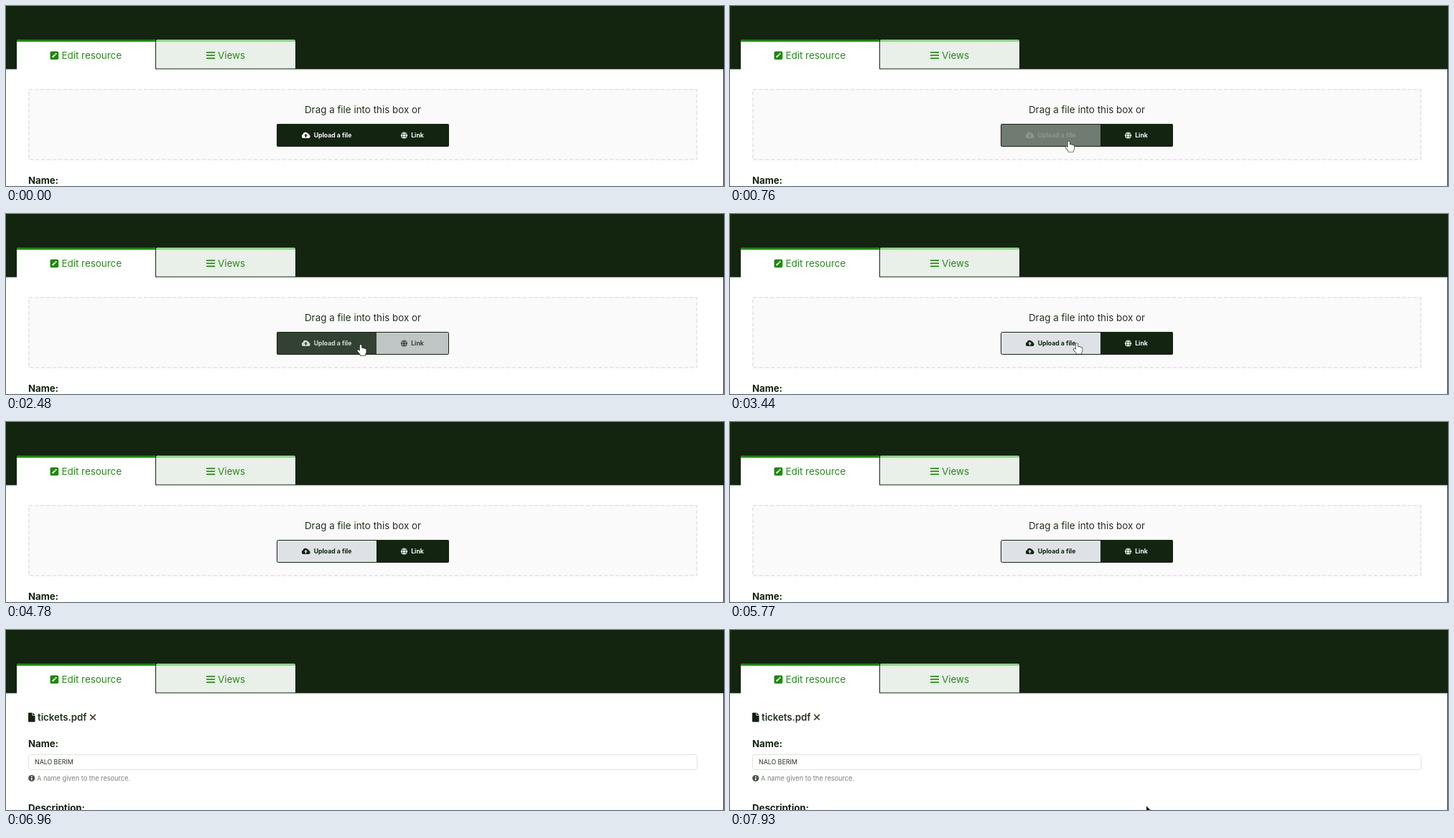
Write an HTML page with a canvas that moves like this. It is 1000 by 252 pixels and loops after 8000 ms.

```html
<!DOCTYPE html>
<html lang="en">
<head>
<meta charset="utf-8">
<title>Edit resource</title>
<style>
  html, body { margin: 0; width: 100%; height: 100%; overflow: hidden; background: #fff; }
  canvas { display: block; width: 1000px; height: 252px; }
</style>
</head>
<body>
<canvas id="stage" width="1000" height="252"></canvas>
<script>
const ctx = document.getElementById('stage').getContext('2d');
const LOOP = 8000;
const LOADING_AT = 6240, DONE_AT = 6700;
const DARK = [19, 36, 16], LIGHT = [222, 226, 230], WHITE = [248, 249, 250];
const INK = '#13240f', BODY = '#23301f', GREEN = '#1b8a03', TAB_TEXT = '#258c18';

// Pointer waypoints: time, x, y of the hot spot
const hoverPath = [
  [300, 470, 258], [860, 472, 183], [1230, 472, 183], [1700, 484, 181],
  [1830, 527, 180], [2000, 560, 181], [2380, 556, 181], [2480, 494, 183],
  [2970, 483, 181], [3850, 483, 181]
];
const returnPath = [[7700, 580, 256], [7920, 580, 246.5], [8000, 580, 246]];

const clamp = v => Math.max(0, Math.min(1, v));
const smooth = v => v * v * (3 - 2 * v);
const fade = (t, start) => smooth(clamp((t - start) / 150));
const mix = (a, b, k) => `rgb(${a.map((v, i) => Math.round(v + (b[i] - v) * k))})`;

function along(path, t) {
  const next = path.findIndex(p => p[0] > t);
  if (next < 1) return null;
  const [t0, x0, y0] = path[next - 1], [t1, x1, y1] = path[next];
  const k = smooth((t - t0) / (t1 - t0));
  return [x0 + (x1 - x0) * k, y0 + (y1 - y0) * k];
}

function rect(x, y, w, h, color, radius = 0) {
  ctx.fillStyle = color;
  ctx.beginPath();
  ctx.roundRect(x, y, w, h, radius);
  ctx.fill();
}

function outline(x, y, w, h, color, radius) {
  ctx.strokeStyle = color;
  ctx.lineWidth = 1;
  ctx.beginPath();
  ctx.roundRect(x, y, w, h, radius);
  ctx.stroke();
}

function text(str, x, y, size, color, weight = 400, align = 'left') {
  ctx.font = `${weight} ${size}px Inter, sans-serif`;
  ctx.textAlign = align;
  ctx.fillStyle = color;
  ctx.fillText(str, x, y);
}

function line(color, width, ...points) {
  ctx.strokeStyle = color;
  ctx.lineWidth = width;
  ctx.beginPath();
  points.forEach(([x, y], i) => i ? ctx.lineTo(x, y) : ctx.moveTo(x, y));
  ctx.stroke();
}

function disc(x, y, r, color) {
  ctx.fillStyle = color;
  ctx.beginPath();
  ctx.arc(x, y, r, 0, Math.PI * 2);
  ctx.fill();
}

function shape(d, x, y, fill, stroke) {
  const path = new Path2D(d);
  ctx.save();
  ctx.translate(x, y);
  if (stroke) {
    ctx.strokeStyle = stroke;
    ctx.lineWidth = 1.2;
    ctx.stroke(path);
  }
  ctx.fillStyle = fill;
  ctx.fill(path);
  ctx.restore();
}

function header() {
  rect(0, 0, 1000, 88.5, INK);
  rect(15, 47, 193, 42, '#fff', [3, 3, 0, 0]);
  rect(15, 47, 193, 3, GREEN, [3, 3, 0, 0]);
  rect(209, 47, 194, 40.5, '#e9efe9', [3, 3, 0, 0]);
  rect(209, 47, 194, 3, '#8bd681', [3, 3, 0, 0]);
  rect(999, 88, 1, 164, '#303630');

  rect(61.5, 63.5, 11.7, 11.5, GREEN, 1.8);
  line('#fff', 2, [64.7, 71.8], [68.6, 67.9]);
  line('#fff', 2, [69.1, 67.4], [70.3, 66.2]);
  text('Edit resource', 119.2, 74, 13.4, TAB_TEXT, 400, 'center');

  for (const y of [65, 69.1, 73.2]) line(GREEN, 1.6, [279, y], [291, y]);
  text('Views', 314, 74, 13.4, TAB_TEXT, 400, 'center');
}

function cloudIcon(x, y, color, hole) {
  rect(x, y - 1, 11.4, 5, color, 2.5);
  disc(x + 2.8, y + 1, 2.8, color);
  disc(x + 5, y - 1, 3.2, color);
  disc(x + 8, y - 0.6, 2.1, color);
  disc(x + 9, y + 1.6, 2.4, color);
  shape('M0 -2.4 L2.4 .3 H.8 V2.6 H-.8 V.3 H-2.4 Z', x + 5.6, y + 0.3, hole);
}

function globeIcon(x, y, color, hole) {
  disc(x, y, 4.6, color);
  ctx.strokeStyle = hole;
  ctx.lineWidth = 0.6;
  ctx.beginPath();
  ctx.ellipse(x, y, 2.1, 4.6, 0, 0, Math.PI * 2);
  ctx.stroke();
  for (const dy of [-1.6, 1.6]) line(hole, 0.6, [x - 4.6, y + dy], [x + 4.6, y + dy]);
}

function dropZone(t) {
  rect(31, 116, 932, 100, '#fafafa');
  ctx.setLineDash([5, 3]);
  ctx.strokeStyle = '#e7e8e7';
  ctx.lineWidth = 2;
  ctx.strokeRect(32, 117, 930, 98);
  ctx.setLineDash([]);
  text('Drag a file into this box or', 497, 150, 13.4, BODY, 400, 'center');

  const upload = fade(t, 690) - fade(t, 1813) + fade(t, 2444);
  const link = fade(t, 1813) - fade(t, 2444);
  const [uploadBg, linkBg] = [upload, link].map(k => mix(DARK, LIGHT, k));
  const [uploadInk, linkInk] = [upload, link].map(k => mix(WHITE, DARK, k));
  rect(377, 165, 139, 32, uploadBg, [2, 0, 0, 2]);
  rect(516, 165, 101, 32, linkBg, [0, 2, 2, 0]);
  outline(377.5, 165.5, 239, 31, INK, 2);

  cloudIcon(412, 181, uploadInk, uploadBg);
  text('Upload a file', 455, 184.2, 8.7, uploadInk, 700, 'center');
  globeIcon(554.5, 181.2, linkInk, linkBg);
  text('Link', 573, 184.2, 8.7, linkInk, 700, 'center');

  text('Name:', 31, 248.5, 13.2, INK, 700);
}

function form(top) {
  text('Name:', 31, top + 5, 13.2, INK, 700);
  rect(31, top + 15.5, 932, 22, '#fff', 3);
  outline(31.5, top + 16, 931, 21, '#e0e5dc', 3);
  text('NALO BERIM', 40, top + 29.3, 8.8, BODY);

  disc(35.7, top + 49, 4.6, '#4b5548');
  rect(35, top + 46, 1.4, 1.4, '#fff');
  rect(35, top + 48.3, 1.4, 3.4, '#fff');
  text('A name given to the resource.', 43, top + 52.5, 9.2, '#7b8279');
  text('Description:', 31, top + 95, 13.2, INK, 700);
}

function loadingBar() {
  rect(31, 115.5, 932, 10, '#e9eaee', 2);
  rect(31, 115.5, 93, 10, GREEN, [2, 0, 0, 2]);
  text('Loading', 77.5, 123, 6.6, '#e6f2e3', 400, 'center');
}

function uploadedFile() {
  shape('M1 0 H5.5 V4 H9.5 V12 Q9.5 13 8.5 13 H1 Q0 13 0 12 V1 Q0 0 1 0 Z M6.4 0 L9.5 3.2 H6.4 Z',
    31, 115.7, INK);
  text('tickets.pdf', 44, 127, 13.2, BODY, 600);
  line('#493b27', 1.7, [117.2, 118.4], [124.8, 126]);
  line('#493b27', 1.7, [124.8, 118.4], [117.2, 126]);
}

function pointer([x, y]) {
  const overButtons = x > 377 && x < 617 && y > 165 && y < 197;
  if (overButtons) {
    shape('M-1.3 1 Q0 -.8 1.3 1 V5 Q2.6 4 3.6 5.4 Q5 4.6 5.7 6 Q7.6 5.4 7.6 7.4 V10 ' +
      'Q7.6 12 6.2 13.5 V14.8 H-.6 V13.4 L-4.6 8.8 Q-4.6 6.7 -2.8 7.6 L-1.3 9 Z',
      x, y, '#fff', '#111');
  } else {
    shape('M0 0 V14 L3.4 11 L5.8 16 L8 15 L5.6 10.2 H10 Z', x, y, '#151515', '#fff');
  }
}

function draw(t) {
  rect(0, 0, 1000, 252, '#fff');
  header();
  if (t < LOADING_AT) {
    dropZone(t);
  } else if (t < DONE_AT) {
    loadingBar();
    form(161);
  } else {
    uploadedFile();
    form(158.5);
  }
  const spot = along(hoverPath, t) || along(returnPath, t);
  if (spot) pointer(spot);
}

const start = performance.now();
function tick() {
  draw((performance.now() - start) % LOOP);
  requestAnimationFrame(tick);
}
tick();
</script>
</body>
</html>
```
